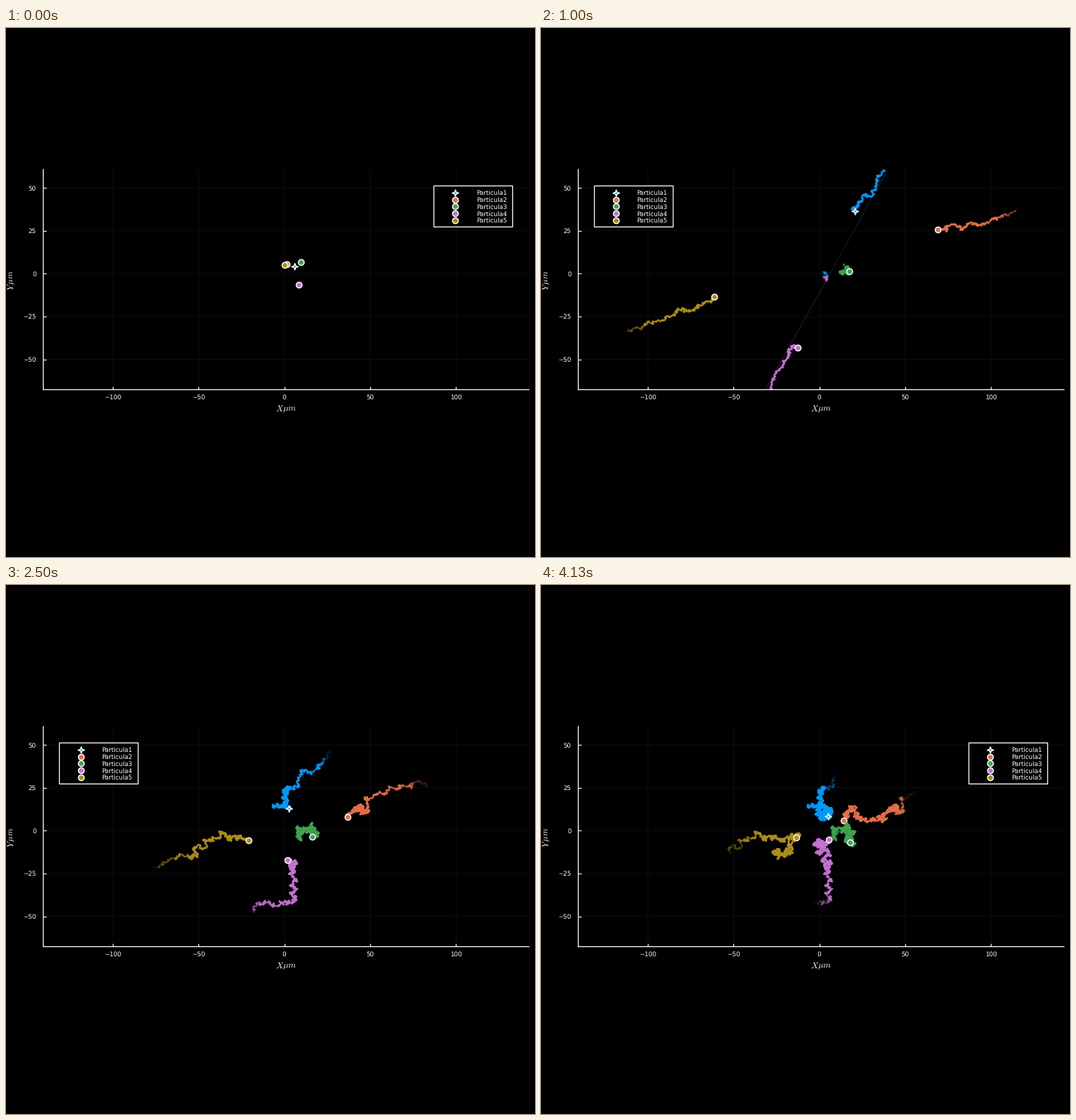
A matplotlib script that plays this animation: 748x748 px, repeating every 4180 ms.

```python
from itertools import pairwise

import matplotlib.pyplot as plt
import numpy as np
from matplotlib.animation import FuncAnimation
from matplotlib.collections import LineCollection
from matplotlib.colors import to_rgb
from matplotlib.patches import Rectangle
from matplotlib.path import Path
from matplotlib.transforms import Affine2D

SIZE, DPI = 748, 88
PX = 72 / DPI                 # one pixel in points
FONT = 8.8 * PX
TICK_MS, LOOP_MS = 20, 4180
FPS, POSES = 24, 100          # the walk advances 24 times a second
STEPS = 10                    # walk steps per pose
FADE = 0.3                    # share of the walk that has faded out
STAR = Path.unit_regular_star(4, innerCircle=0.36)

# Two pairs meet and repel each other: (pose, meeting point, push)
EARLY = (0, 0.7 + 5j, 139 + 38j)
LATE = (10, 4.5 - 3j, 39 + 70j)

# Way points x + yj in micrometres, reached at these poses
KEYS = (16, 22, 32, 40, 47, 53, 60, 68, 75, 87, 99)
# color, marker, start, meeting, push sign, way points
SERIES = [
    ("#009afa", STAR, 6 + 4.3j, LATE, 1,
     [32.2 + 48.7j, 21 + 38j, 8 + 26.9j, 22j, 18.7j, -6 + 14j,
      2.7 + 12.8j, -1 + 10j, 2.3 + 11.6j, 4 + 14j, 5.2 + 8.4j]),
    ("#e36f47", "o", 1.3 + 5.3j, EARLY, 1,
     [85.8 + 28.9j, 74 + 24.5j, 48.1 + 17.7j, 47 + 10j, 44.5 + 15.4j,
      45 + 13j, 36.7 + 8j, 31 + 7j, 23.5 + 7.1j, 19.5 + 13j, 14.3 + 5.8j]),
    ("#3ea44e", "o", 9.5 + 6.8j, None, 0,
     [15.5 + 0.4j, 16 + 2j, 8.3 - 1j, 9 - 4j, 8.8 + 1.2j, 13 + 1j,
      16 - 3.4j, 17 + 1j, 18 - 1.9j, 17 - 4j, 18 - 6.9j]),
    ("#c371d2", "o", 8.5 - 6.5j, LATE, -1,
     [-21.3 - 54.7j, -16 - 42j, 2.8 - 40.8j, 5 - 36.5j, 3.7 - 25j,
      3 - 21j, 1.8 - 17.2j, 4 - 12j, -0.8 - 5.6j, -7j, 5.3 - 5.3j]),
    ("#ac8e18", "o", 0.1 + 5j, EARLY, -1,
     [-82.1 - 20.9j, -64 - 16j, -52.5 - 10j, -39 - 4.5j, -32.7 - 3.7j,
      -26 - 3.5j, -20.8 - 5.6j, -21 - 14j, -23.5 - 10.7j, -17 - 9j,
      -13.5 - 3.8j]),
]


def walk(start, meeting, sign, points, rng):
    """Random walk through the way points, with one sudden push."""
    anchors = [(0, start)]
    if meeting:
        pose, spot, push = meeting
        step = pose * STEPS
        if step:
            anchors.append((step, spot))
        anchors.append((step + 1, spot + sign * push))
    anchors += [(k * STEPS, p) for k, p in zip(KEYS, points)]

    path = [np.array([start])]
    for (s0, a), (s1, b) in pairwise(anchors):
        n = s1 - s0
        u = np.arange(1, n + 1) / n
        noise = (rng.uniform(-0.8, 0.8, (n, 2)) @ [1, 1j]).cumsum()
        path.append(a + (b - a) * u + noise - noise[-1] * u)
    path = np.concatenate(path)
    return np.column_stack([path.real, path.imag])


def dot_style(marker, color):
    return dict(ls="none", marker=marker, mfc=color, mec="white",
                ms=(9.2 if marker is STAR else 8.2) * PX, mew=1.5 * PX)


class Particle:
    def __init__(self, ax, path, color, marker, order):
        self.path = path
        self.segments = np.stack([path[:-1], path[1:]], axis=1)
        # Short steps pile up into a thick, dense band; a push stays thin.
        jump = np.hypot(*np.diff(path, axis=0).T) > 5
        self.width = np.where(jump, 1.4, 2.5) * PX
        self.density = np.where(jump, 1, 4)
        self.rgb = to_rgb(color)
        self.trail = LineCollection([], capstyle="round",
                                    zorder=3 + order / 10)
        ax.add_collection(self.trail, autolim=False)
        self.dot, = ax.plot([], [], zorder=3.05 + order / 10,
                            **dot_style(marker, color))

    def show(self, pose):
        n = pose * STEPS
        part = slice(int(FADE * n), n)
        age = np.arange(part.start + 1, n + 1) / max(n, 1)
        alpha = np.clip((age - FADE) / (1 - FADE), 0, 1)
        rgba = np.empty((len(age), 4))
        rgba[:, :3] = self.rgb
        rgba[:, 3] = 1 - (1 - alpha) ** self.density[part]
        self.trail.set_segments(self.segments[part])
        self.trail.set_color(rgba)
        if n:
            self.trail.set_linewidth(self.width[part])
        self.dot.set_data(self.path[n:n + 1].T)


plt.rcParams.update({"font.family": "DejaVu Sans", "mathtext.fontset": "cm",
                     "text.color": "white", "text.hinting": "none"})
fig = plt.figure(figsize=(SIZE / DPI, SIZE / DPI), dpi=DPI, facecolor="black")

# Plot area
L, R, T, B = 52.7, 739.5, 200, 511.4
X0, Y0, UNIT = 393.7, 347.3, 2.426
ax = fig.add_axes([L / SIZE, 1 - B / SIZE, (R - L) / SIZE, (B - T) / SIZE],
                  facecolor="black")
ax.set(xlim=((L - X0) / UNIT, (R - X0) / UNIT),
       ylim=((Y0 - B) / UNIT, (Y0 - T) / UNIT),
       xticks=range(-100, 101, 50), yticks=range(-50, 51, 25))
ax.spines[["top", "right"]].set_visible(False)
for side in ("left", "bottom"):
    ax.spines[side].set(color="white", linewidth=1.3 * PX, snap=False)
ax.tick_params(direction="in", length=4 * PX, width=1.2 * PX, color="white",
               labelcolor="white", labelsize=FONT)
ax.tick_params(axis="x", pad=7 * PX)
ax.tick_params(axis="y", pad=10 * PX)
ax.set_axisbelow(True)
ax.grid(color="#121212", linewidth=0.8 * PX, snap=False)

# Labels and legend, placed in pixels
hud = fig.add_axes([0, 0, 1, 1], facecolor="none")
hud.set(xlim=(0, SIZE), ylim=(SIZE, 0))
hud.axis("off")
hud.text(396, 541, r"$X\mu m$", ha="center", fontsize=12.2 * PX)
hud.text(10.5, 356.5, r"$Y\,\mu m$", ha="center", fontsize=12.2 * PX,
         rotation=90, rotation_mode="anchor")

shift = Affine2D()
place = shift + hud.transData
hud.add_patch(Rectangle((605, 223.3), 111.4, 58, fc="black", ec="white",
                        lw=1.3 * PX, snap=False, transform=place))

rng = np.random.default_rng(4)
particles = []
for i, (color, marker, start, meeting, sign, points) in enumerate(SERIES):
    path = walk(start, meeting, sign, points, rng)
    particles.append(Particle(ax, path, color, marker, i))
    y = 233 + 9.7 * i
    hud.plot([635.5], [y], transform=place, **dot_style(marker, color))
    hud.text(664.8, y + 3.3, f"Particula{i + 1}", fontsize=FONT,
             transform=place)


def update(tick):
    pose = min(int((tick * TICK_MS + 15) * FPS / 1000), POSES - 1)
    for p in particles:
        p.show(pose)
    # The legend moves aside while the orange trail is near it.
    shift.clear().translate(-529.5 if 1 <= pose < 70 else 0, 0)
    return []


anim = FuncAnimation(fig, update, frames=LOOP_MS // TICK_MS,
                     init_func=lambda: update(0), interval=TICK_MS,
                     repeat=True)
plt.show()
```
